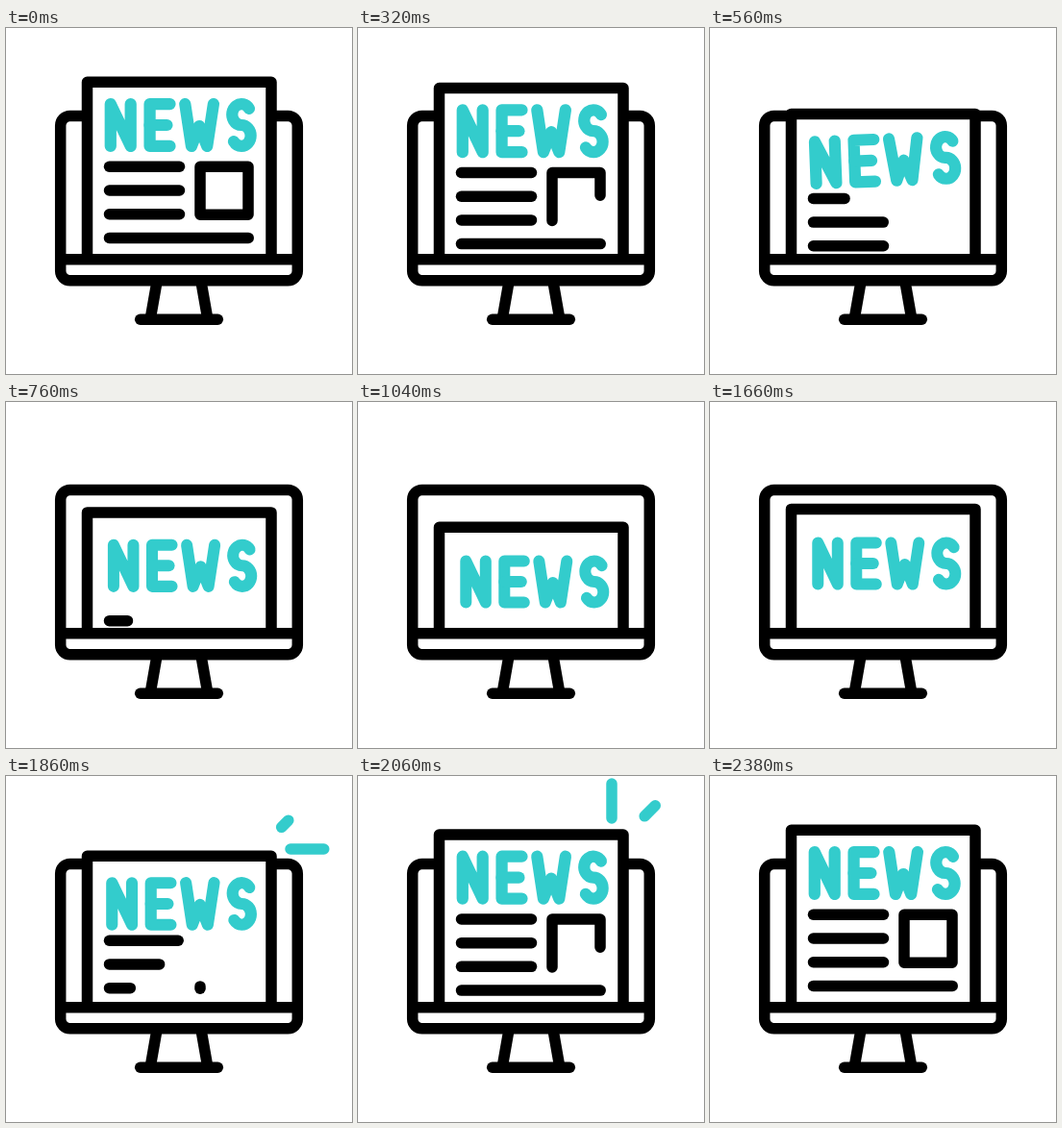
Animation of 360x360 px, one loop 2.4 s. Source, as an HTML page with a canvas:

```html
<!DOCTYPE html>
<html lang="en">
<head>
<meta charset="utf-8">
<title>News monitor</title>
<style>
html, body { margin: 0; width: 100%; height: 100%; overflow: hidden; background: #fff; }
canvas { display: block; width: 360px; height: 360px; }
</style>
</head>
<body>
<canvas id="stage" width="360" height="360"></canvas>
<script>
const ctx = document.getElementById('stage').getContext('2d');
const LOOP = 2400, INK = '#000', TEAL = '#33cccc', WEIGHT = 11.5;

const clamp = v => Math.min(1, Math.max(0, v));
const ease = (t, start, span) => (1 - Math.cos(Math.PI * clamp((t - start) / span))) / 2;
const mix = (a, b, k) => a + (b - a) * k;
const between = (p, q, k) => [mix(p[0], q[0], k), mix(p[1], q[1], k)];

function stroke(points, color = INK, width = WEIGHT) {
  ctx.strokeStyle = color;
  ctx.lineWidth = width;
  ctx.beginPath();
  points.forEach(p => ctx.lineTo(...p));
  ctx.stroke();
}

function line(a, b, from, to, color) {
  if (to - from > 0.005) stroke([between(a, b, from), between(a, b, to)], color);
}

function drawMonitor() {
  ctx.strokeStyle = INK;
  ctx.lineWidth = WEIGHT;
  ctx.beginPath();
  ctx.roundRect(56.7, 91.5, 246.6, 171.3, 10);
  ctx.stroke();
}

function drawStand() {
  const middle = 180;
  stroke([[57, 240.8], [303, 240.8]]);
  for (const side of [-1, 1]) stroke([[middle + 23 * side, 264], [middle + 29.5 * side, 301]]);
  stroke([[middle - 40.3, 303.3], [middle + 40.3, 303.3]]);
}

// A square whose outline is drawn clockwise from the bottom left corner.
function drawPicture(left, top, size, amount) {
  const sides = amount * 4;
  if (sides < 0.02) return;
  const corner = i => [left + (i & 2 ? size : 0), top + ((i + 1) & 2 ? 0 : size)];
  const points = [corner(0)];
  for (let i = 0; i < sides; i++) points.push(between(corner(i), corner(i + 1), clamp(sides - i)));
  stroke(points);
}

function drawTitle(t, drop) {
  const k = ease(t, 400, 460) - ease(t, 1640, 400);
  const scale = mix(1.02, 1, k);
  const h = 21.5;
  const pen = points => stroke(points, TEAL, 12);

  ctx.save();
  ctx.translate(mix(181.2, 183.3, k), 101 + drop + 12 * k);
  ctx.rotate(-0.038 * Math.sin(Math.PI * clamp((t - 360) / 400)) ** 2);
  ctx.scale(scale, scale);

  pen([[-71, h], [-71, -h], [-50.5, h], [-50.5, -h]]);
  pen([[-10.5, -h], [-31, -h], [-31, h], [-10.5, h]]);
  pen([[-31, 0], [-13.5, 0]]);
  pen([[5, -h], [11.5, h], [19.5, 1], [27.5, h], [34, -h]]);

  ctx.beginPath();
  ctx.ellipse(62.5, -h / 2, 9.5, h / 2, 0, -0.6, Math.PI / 2, true);
  ctx.ellipse(62.5, h / 2, 9.5, h / 2, 0, -Math.PI / 2, Math.PI - 0.6);
  ctx.stroke();
  ctx.restore();
}

function drawPaper(t) {
  const drop = 74 * (ease(t, 160, 860) - ease(t, 1392, 798));
  const top = 56.3 + drop, left = 84.5, right = 276;
  const row = i => top + 88 + 24.7 * i;

  ctx.save();
  ctx.beginPath();
  ctx.rect(0, 0, 360, 241);
  ctx.clip();
  ctx.fillStyle = '#fff';
  ctx.fillRect(left, top, right - left, 241 - top);
  stroke([[left, 260], [left, top], [right, top], [right, 260]]);

  // Rows are wiped one after another, then written back.
  for (let i = 0; i < 4; i++) {
    const end = i < 3 ? 180.5 : 252.2;
    const shown = 1 - ease(t, 390 + 160 * i, 320) + ease(t, 1660 + 60 * i, 220);
    line([107.5, row(i)], [end, row(i)], 0, shown);
  }
  drawPicture(202, row(0), 50, 1 - ease(t, 160, 380) + ease(t, 1835, 380));
  drawTitle(t, drop);
  ctx.restore();
}

// Three rays fan out from the paper's corner, the middle one shorter.
function drawRays(t) {
  for (let i = 0; i < 3; i++) {
    const angle = i * Math.PI / 4, reach = i === 1 ? 64 : 68;
    const at = r => [264 + r * Math.cos(angle), 76 - r * Math.sin(angle)];
    const start = 1720 + 80 * i;
    line(at(32), at(reach), ease(t, start + 180, 160), ease(t, start, 160), TEAL);
  }
}

function drawFrame(t) {
  ctx.fillStyle = '#fff';
  ctx.fillRect(0, 0, 360, 360);
  ctx.lineCap = ctx.lineJoin = 'round';
  drawMonitor();
  drawPaper(t);
  drawStand();
  drawRays(t);
}

const began = performance.now();
function tick() {
  drawFrame((performance.now() - began) % LOOP);
  requestAnimationFrame(tick);
}
tick();
</script>
</body>
</html>
```
